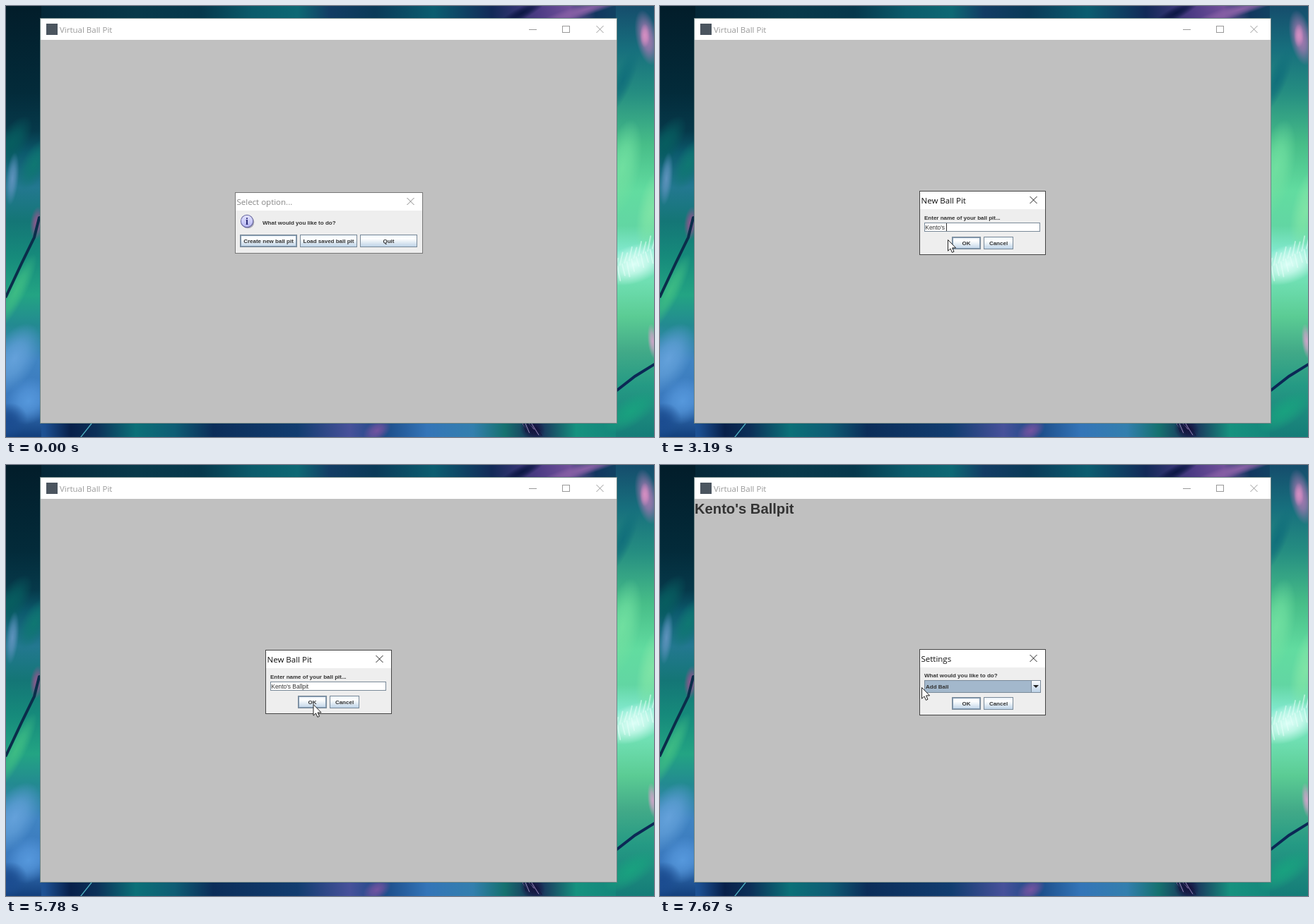
Write an HTML page with a canvas that moves like this. It is 917x611 px and loops after 8000 ms.

```html
<!DOCTYPE html>
<html lang="en">
<head>
<meta charset="utf-8">
<title>Virtual Ball Pit</title>
<style>
html, body { margin: 0; width: 100%; height: 100%; overflow: hidden; background: #0b3c50; }
canvas { display: block; width: 917px; height: 611px; }
</style>
</head>
<body>
<canvas id="stage" width="917" height="611"></canvas>
<script>
const W = 917, H = 611, LOOP = 8000;
const UI = '11.5px "Open Sans", "Noto Sans", sans-serif';
const BOLD = 'bold 8px "Liberation Sans", Arial, sans-serif';
const PLAIN = '8.4px "Liberation Sans", Arial, sans-serif';
const PIT = "Kento's Ballpit";
const ctx = document.getElementById('stage').getContext('2d');
const backdrop = paintBackdrop();

// start, end, steps, from x, from y, to x, to y
const MOVES = [
  [480, 1110, 11, 764, 606, 401, 334],
  [2070, 2120, 2, 401, 334, 407, 331],
  [5090, 5590, 9, 407, 331, 434.5, 339],
  [6230, 6540, 6, 435, 339, 451.5, 333],
  [7170, 7670, 8, 451.5, 333, 370, 315]
];

// time and text in the name field
const TYPING = [
  [2560, 'K'], [2650, 'Ke'], [2760, 'Kent'], [2870, 'Kento'],
  [3010, "Kento'"], [3100, "Kento's"], [3190, "Kento's "], [3300, "Kento's B"],
  [3490, "Kento's Bl"], [3610, "Kento's Bll"], [3990, "Kento's Bl"], [4090, "Kento's B"],
  [4180, "Kento's Ba"], [4280, "Kento's Bal"], [4380, "Kento's Ball"], [4470, "Kento's Ballp"],
  [4570, "Kento's Ballpi"], [4670, PIT]
];

function rect(x, y, w, h, fill, stroke) {
  if (fill) { ctx.fillStyle = fill; ctx.fillRect(x, y, w, h); }
  if (stroke) {
    ctx.strokeStyle = stroke;
    ctx.lineWidth = 1;
    ctx.strokeRect(x + .5, y + .5, w - 1, h - 1);
  }
}

function text(str, x, y, font, color = '#333', align = 'left') {
  ctx.font = font;
  ctx.fillStyle = color;
  ctx.textAlign = align;
  ctx.fillText(str, x, y);
}

function line(c, points, color, width) {
  c.beginPath();
  points.forEach(([x, y]) => c.lineTo(x, y));
  c.strokeStyle = color;
  c.lineWidth = width;
  c.stroke();
}

function cross(x, y, r, color) {
  line(ctx, [[x - r, y - r], [x + r, y + r]], color, 1);
  line(ctx, [[x + r, y - r], [x - r, y + r]], color, 1);
}

function paintBackdrop() {
  const layer = document.createElement('canvas');
  layer.width = W;
  layer.height = H;
  const c = layer.getContext('2d');

  function strip(x, y, w, h, stops) {
    const g = w > h ? c.createLinearGradient(0, 0, W, 0) : c.createLinearGradient(0, 0, 0, H);
    stops.forEach(([p, color]) => g.addColorStop(p, color));
    c.fillStyle = g;
    c.fillRect(x, y, w, h);
  }
  function blob(x, y, rx, ry, angle, color) {
    c.save();
    c.translate(x, y);
    c.rotate(angle);
    c.scale(rx, ry);
    const g = c.createRadialGradient(0, 0, 0, 0, 0, 1);
    g.addColorStop(0, color);
    g.addColorStop(.45, color + 'b0');
    g.addColorStop(1, color + '00');
    c.fillStyle = g;
    c.fillRect(-1, -1, 2, 2);
    c.restore();
  }

  strip(0, 0, W, 20, [[0, '#03222f'], [.1, '#062c3e'], [.2, '#08394a'], [.3, '#06384c'], [.38, '#0b5b6b'],
    [.45, '#0d6874'], [.5, '#123c64'], [.57, '#0a3a58'], [.66, '#0b5d70'], [.75, '#122a58'],
    [.82, '#4b3b84'], [.87, '#71509a'], [.91, '#12375f'], [1, '#0f5668']]);
  strip(0, 590, W, 21, [[0, '#2c6cae'], [.06, '#1c4f91'], [.1, '#07204a'], [.14, '#0c3058'], [.2, '#0b7078'],
    [.26, '#0e5d74'], [.32, '#0b2d59'], [.45, '#123d70'], [.53, '#47519a'], [.58, '#1b4a86'],
    [.65, '#3475b8'], [.72, '#337fae'], [.77, '#15716f'], [.82, '#1b2a58'], [.88, '#16927f'], [1, '#147b78']]);
  strip(0, 0, 50, H, [[0, '#021d2a'], [.2, '#032b3a'], [.29, '#06394a'], [.34, '#0b5a6c'], [.42, '#237890'],
    [.5, '#147676'], [.58, '#168a7b'], [.67, '#23a483'], [.74, '#238a91'], [.82, '#4084c2'],
    [.92, '#3a78be'], [1, '#123f7c']]);
  strip(863, 0, 54, H, [[0, '#154d6c'], [.1, '#176f7d'], [.2, '#258d81'], [.32, '#47bd88'], [.43, '#62dca0'],
    [.51, '#62d6a3'], [.57, '#82e9ce'], [.64, '#6fdfb2'], [.72, '#5bcc94'], [.8, '#42aa88'],
    [.88, '#259a84'], [1, '#157c78']]);

  blob(8, 195, 45, 20, -1, '#075d5f');
  blob(40, 225, 40, 18, -1.1, '#0f7772');
  blob(9, 245, 9, 38, .1, '#5d92bc');
  blob(44, 308, 10, 24, .1, '#94558f');
  blob(14, 405, 60, 14, -1.1, '#3dbb84');
  blob(12, 500, 30, 55, .5, '#64a1da');
  blob(32, 560, 30, 35, .6, '#5698dc');
  blob(2, 590, 30, 25, -.7, '#1b4c90');
  blob(907, 45, 16, 40, -.2, '#b07ab5');
  blob(904, 42, 7, 17, 0, '#d58fc2');
  blob(873, 105, 14, 50, .4, '#116f7b');
  blob(872, 230, 25, 70, .2, '#70dfa0');
  blob(914, 290, 20, 60, .2, '#7fe4a6');
  blob(915, 475, 7, 25, -.1, '#cda4c8');
  blob(884, 575, 45, 20, -.6, '#19a17f');
  blob(820, 5, 75, 9, -.3, '#8961a6');
  blob(730, 10, 40, 9, -.5, '#0b1744');
  blob(525, 602, 22, 14, -.6, '#7353a0');
  blob(745, 600, 18, 15, .3, '#15153f');

  c.lineCap = 'round';
  line(c, [[47, 300], [40, 328], [22, 365], [0, 412]], '#0a2d4a', 4);
  line(c, [[863, 546], [890, 525], [919, 507]], '#0b2855', 4);
  line(c, [[106, 611], [121, 592]], '#4eafc0', 1.3);

  // soft seed head on the right, small grass tuft below
  blob(889, 366, 48, 27, -.35, '#dcfff7');
  for (let i = 0; i < 18; i++) {
    const x = 862 + i * 3.3, y = 371 - i * 1.7;
    line(c, [[x, y], [x + 4, y + (i % 2 ? 1 : -1) * (13 + i * 7 % 9)]], '#e8fffa80', 2);
  }
  for (let i = 0; i < 12; i++) {
    line(c, [[730 + i * 1.4, 590], [734 + i * 2.2, 597 + i * 7 % 13]], i % 3 ? '#16143f' : '#9b86bb', 1);
  }
  return layer;
}

function drawWindow(active, named) {
  const ink = active ? '#111' : '#999';
  rect(48, 17, 817, 575, '#c0c0c0', '#6f8585');
  rect(49, 18, 815, 30, '#fff');
  rect(57, 25, 16, 16, '#4b555f');
  text('Virtual Ball Pit', 76, 38, UI, ink);
  rect(740, 33, 11, 1, ink);
  rect(787, 28, 11, 10, null, ink);
  cross(840.5, 33, 5, ink);
  if (named) text(PIT, 49, 68.5, 'bold 20.2px "Liberation Sans", Arial, sans-serif');
}

function dialog(x, y, w, h, title, active = true) {
  rect(x, y, w, h, '#eee', active ? '#444' : '#777');
  rect(x + 1, y + 1, w - 2, 25, '#fff');
  text(title, x + 2.5, y + 17.5, UI, active ? '#111' : '#888');
  cross(x + w - 17.5, y + 13, 5, active ? '#222' : '#888');
}

function button(x, y, w, label, { focus = false, pressed = false } = {}) {
  const h = 18, g = ctx.createLinearGradient(0, y, 0, y + h);
  g.addColorStop(0, '#e3edf6');
  g.addColorStop(.3, '#fff');
  g.addColorStop(.5, '#edf3f8');
  g.addColorStop(1, '#b8cfe5');
  rect(x, y, w, h, pressed ? '#a3b8cc' : g, '#7a8a99');
  if (focus) rect(x + 1, y + 1, w - 2, h - 2, null, '#8299b0');
  text(label, x + w / 2, y + 12, BOLD, '#333', 'center');
}

function infoIcon(x, y) {
  const disc = (dx, r, fill) => {
    ctx.beginPath();
    ctx.arc(x + dx, y + dx, r, 0, Math.PI * 2);
    ctx.fillStyle = fill;
    ctx.fill();
  };
  const g = ctx.createLinearGradient(0, y - 9, 0, y + 9);
  g.addColorStop(0, '#e4e4ff');
  g.addColorStop(1, '#b5b5f2');
  disc(1.3, 9, '#aaaab8');
  disc(0, 9.2, '#62629c');
  disc(0, 8.2, g);
  text('i', x, y + 4.5, 'bold 14px "Liberation Serif", serif', '#2d2d78', 'center');
}

function optionDialog(pressed) {
  dialog(324, 264, 266, 87, 'Select option...', pressed);
  infoIcon(341, 305);
  text('What would you like to do?', 363, 310, BOLD);
  button(331, 324, 81, 'Create new ball pit', { focus: true, pressed });
  button(416, 324, 81, 'Load saved ball pit');
  button(501, 324, 81, 'Quit');
}

function nameDialog(t) {
  const [last, value] = TYPING.filter(([at]) => at <= t).pop() || [1570, 'My Ball Pit'];
  const selected = t < TYPING[0][0];
  dialog(367, 262, 179, 91, 'New Ball Pit');
  text('Enter name of your ball pit...', 374, 302.5, BOLD);
  rect(374, 307, 164, 13, '#fff', '#7a8a99');
  ctx.font = PLAIN;
  const width = ctx.measureText(value).width;
  if (selected) rect(375, 308, width + 1, 11, '#b8cfe5');
  text(value, 375.3, 316.8, PLAIN);
  if (Math.floor((t - last) / 500) % 2 === 0 && t < 5630) {
    rect(Math.round(375 + width), 308, 1, 11, '#333');
  }
  button(413, 327, 41, 'OK', { focus: true, pressed: t >= 5630 && t < 5750 });
  button(458, 327, 42, 'Cancel');
}

function createdDialog() {
  dialog(367, 264, 179, 87, PIT);
  text(PIT + ' was successfully created!', 374, 310, BOLD);
  button(443, 324, 26, 'OK', { focus: true });
  rect(449, 327, 14, 11, null, '#a3b8cc');
}

function settingsDialog() {
  dialog(367, 261, 179, 94, 'Settings');
  text('What would you like to do?', 374, 301, BOLD);
  rect(374, 305, 165, 18, '#a3b8cc', '#7a8a99');
  text('Add Ball', 376, 317, BOLD);
  const g = ctx.createLinearGradient(0, 305, 0, 323);
  g.addColorStop(0, '#fff');
  g.addColorStop(1, '#b8cfe5');
  rect(525, 305, 14, 18, g, '#7a8a99');
  ctx.beginPath();
  ctx.moveTo(528, 312);
  ctx.lineTo(536, 312);
  ctx.lineTo(532, 316);
  ctx.fillStyle = '#222';
  ctx.fill();
  button(413, 329, 41, 'OK', { focus: true });
  button(458, 329, 42, 'Cancel');
}

function pointerAt(t) {
  const move = MOVES.filter(m => m[0] <= t).pop();
  if (!move) return null;
  const [start, end, steps, x0, y0, x1, y1] = move;
  const step = Math.floor((t - start) / ((end - start) / (steps - 1)) + 1e-6) + 1;
  const p = Math.min(1, step / steps), ease = p * (2 - p);
  return [x0 + (x1 - x0) * ease, y0 + (y1 - y0) * ease];
}

function drawPointer(t) {
  const at = pointerAt(t);
  if (!at) return;
  const clicking = (t >= 1360 && t < 1490) || (t >= 5630 && t < 5750);
  ctx.save();
  ctx.translate(...at);
  if (clicking) {
    ctx.beginPath();
    ctx.arc(0, -1, 11, 0, Math.PI * 2);
    ctx.fillStyle = 'rgba(232,228,30,.72)';
    ctx.fill();
  }
  const arrow = new Path2D('M.5 .5V16.2L4 12.9L6.4 18.4L9 17.2L6.6 11.9H11.6Z');
  ctx.fillStyle = '#fff';
  ctx.fill(arrow);
  ctx.strokeStyle = '#222';
  ctx.lineWidth = 1;
  ctx.stroke(arrow);
  ctx.restore();
}

function draw(t) {
  ctx.drawImage(backdrop, 0, 0);
  const active = (t >= 1490 && t < 1610) || (t >= 6850 && t < 7170);
  drawWindow(active, t >= 5850);
  if (t < 1490) optionDialog(t >= 1360);
  else if (t >= 1610 && t < 5850) nameDialog(t);
  else if (t >= 5850 && t < 6850) createdDialog();
  else if (t >= 7170) settingsDialog();
  drawPointer(t);
}

const began = performance.now();
function tick() {
  draw((performance.now() - began) % LOOP);
  requestAnimationFrame(tick);
}
tick();
</script>
</body>
</html>
```
